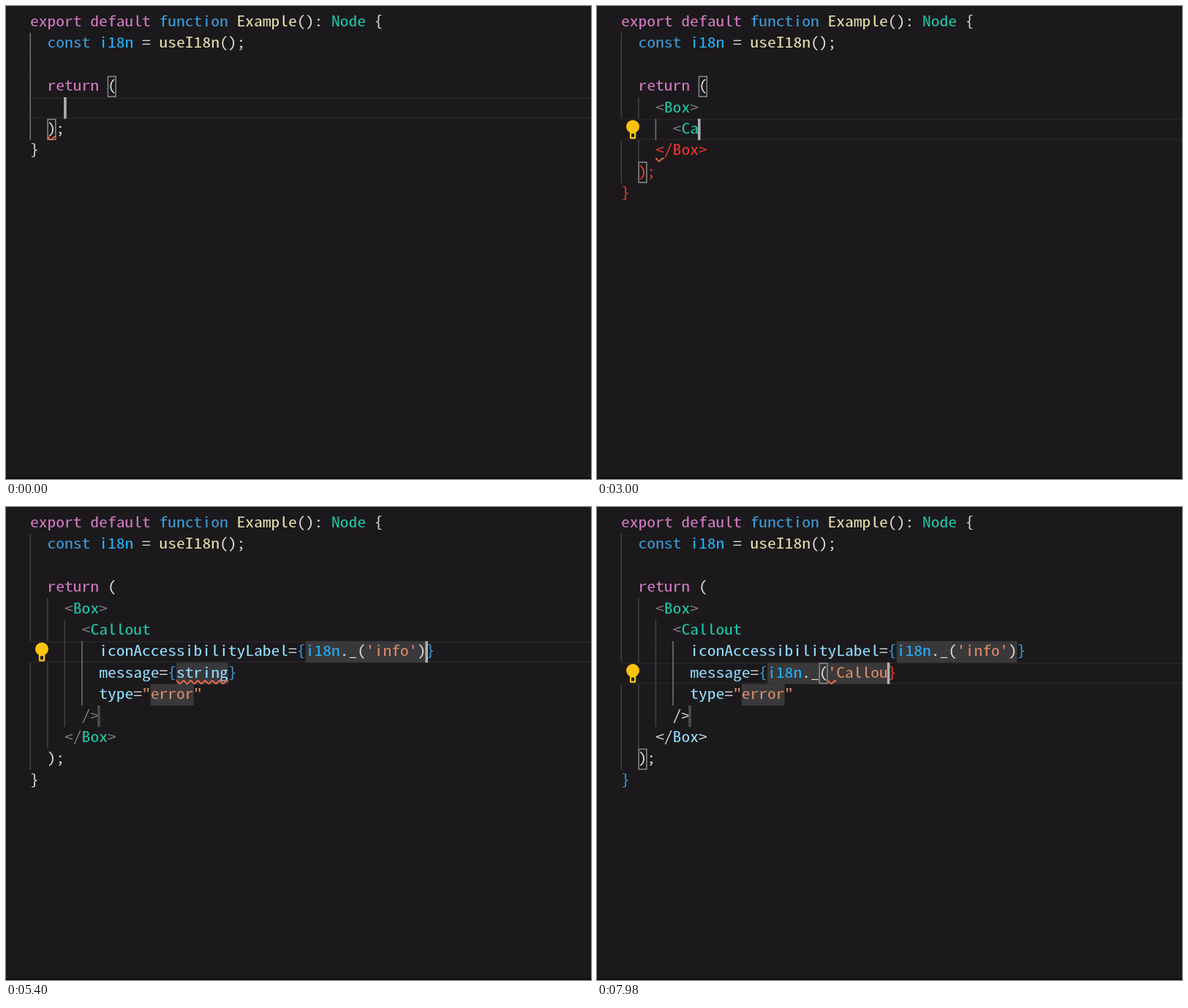
An HTML page with a canvas for the animation above (8000 ms loop, 800x648 px).

```html
<!DOCTYPE html>
<html lang="en">
<head>
<meta charset="utf-8">
<title>Code editor</title>
<style>
  html, body { margin: 0; width: 100%; height: 100%; overflow: hidden; background: #1b191b; }
  canvas { display: block; }
</style>
</head>
<body>
<canvas id="stage" width="800" height="648"></canvas>
<script>
const ctx = document.getElementById('stage').getContext('2d');
const LOOP = 8000, LEFT = 33, TOP = 7.4, CELL = 11.77, ROW = 29.4;
const BACKGROUND = '#1b191b', PLACEHOLDER = '#39383a', SELECTION = '#15497a';
const COLORS = {
  p: '#d079c2', b: '#3c9ad8', v: '#22b2fa', y: '#e0e0ac', w: '#dadada',
  t: '#1dc9a8', a: '#92dcff', s: '#da8a68', g: '#7f7f7f', r: '#f2382f', d: '#2085b5'
};

// One advance fills one grid cell; a half-width face is flattened to the usual 0.6 em proportion.
const FAMILY = '"Noto Sans Mono CJK JP", "Noto Sans Mono", monospace';
ctx.font = '100px ' + FAMILY;
const ADVANCE = ctx.measureText('0').width / 100;
const FONT = CELL / ADVANCE + 'px ' + FAMILY;
const FLATTEN = ADVANCE / 0.6;

// Keystrokes: field, time of the first key, time between keys, text.
const KEYS = [
  ['box', 900, 130, '<Box'],
  ['callout', 2700, 140, '<Cal'],
  ['label', 3880, 66, "i18n._('"],
  ['label', 4480, 110, 'info'],
  ['label', 5000, 150, "')"],
  ['message', 6650, 80, "i18n._('"],
  ['message', 7420, 100, 'Callou']
].flatMap(([field, start, step, text]) =>
  [...text].map((char, i) => ({ field, char, time: start + i * step })));
const BOX_INSERTED = 1500, CALLOUT_INSERTED = 3260, NEXT_FIELD = 5800, CHECK_DELAY = 250;
const CARET_RESETS = [0, BOX_INSERTED, CALLOUT_INSERTED, NEXT_FIELD, ...KEYS.map(k => k.time)];

const typed = (field, t) =>
  KEYS.filter(k => k.field === field && k.time <= t).map(k => k.char).join('');
const colX = col => LEFT + col * CELL;
const rowY = row => TOP + row * ROW;

function fill(color, x, y, w, h, radius = 0) {
  ctx.fillStyle = color;
  ctx.beginPath();
  ctx.roundRect(x, y, w, h, radius);
  ctx.fill();
}

const mark = (color, row, col, length, radius) =>
  fill(color, colX(col), rowY(row), length * CELL, ROW, radius);

// A tilde and a letter switch the colour of the text that follows.
function text(row, col, markup) {
  ctx.save();
  ctx.font = FONT;
  ctx.translate(0, rowY(row) + 20.6);
  ctx.scale(1, FLATTEN);
  for (const run of markup.split('~').slice(1)) {
    const content = run.slice(1);
    ctx.fillStyle = COLORS[run[0]];
    ctx.fillText(content, colX(col), 0);
    col += content.length;
  }
  ctx.restore();
}

function lineHighlight(row) {
  fill('#252326', 36, rowY(row), 764, 2);
  fill('#252326', 36, rowY(row) + ROW - 2, 764, 2);
}

function guides(list, bulbRow) {
  for (const [level, first, last, active] of list) {
    for (let row = first; row <= last; row++) {
      if (row === bulbRow && level < 2) continue;
      fill(active ? '#6c6b6c' : '#3f3e40', colX(level * 2) - 0.6, rowY(row), 1.7, ROW);
    }
  }
}

function bracketBox(row, col) {
  ctx.strokeStyle = '#868686';
  ctx.lineWidth = 1.6;
  ctx.strokeRect(colX(col) + 0.5, rowY(row) + 0.9, CELL - 1, ROW - 1.8);
}

function squiggle(row, col, length) {
  const start = colX(col), end = colX(col + length), y = rowY(row) + 26.8;
  ctx.strokeStyle = '#f2684a';
  ctx.lineWidth = 1.9;
  ctx.beginPath();
  for (let x = start; x <= end; x += 0.5) ctx.lineTo(x, y - 2 * Math.cos((x - start) * Math.PI / 4.9));
  ctx.stroke();
}

function bulb(row) {
  const y = rowY(row);
  ctx.fillStyle = '#ffc20d';
  ctx.beginPath();
  ctx.arc(49, y + 10.8, 9, 0, Math.PI * 2);
  ctx.fill();
  fill('#ffc20d', 44.8, y + 17, 8.4, 10.6, 1.5);
  fill(BACKGROUND, 47, y + 20.4, 4, 4.8);
}

function caret(row, col, t) {
  const idle = t - Math.max(...CARET_RESETS.filter(time => time <= t));
  if (idle % 1000 < 500) fill('#aeafad', colX(col) - 1, rowY(row), 3.6, ROW);
}

const header = (t, unused) => {
  text(0, 0, '~pexport default ~bfunction ~yExample~w(): ~tNode ~w{');
  text(1, 2, `~bconst ~${unused ? 'd' : 'v'}i18n ~w= ~yuseI18n~w();`);
  text(3, 2, '~preturn ~w(');
};

function emptyScene(t) {
  const tag = typed('box', t), tail = tag ? 'r' : 'w';
  lineHighlight(4);
  guides(tag ? [[0, 1, 5], [1, 4, 4, true]] : [[0, 1, 5, true]]);
  bracketBox(3, 9);
  bracketBox(5, 2);
  header(t);
  if (tag) text(4, 4, `~g<~t${tag.slice(1)}`);
  text(5, 2, `~${tail});`);
  text(6, 0, `~${tail}}`);
  if (!tag) squiggle(5, 2, 1);
  caret(4, 4 + tag.length, t);
}

function boxScene(t) {
  const tag = typed('callout', t), checked = t >= BOX_INSERTED + CHECK_DELAY;
  const bulbRow = tag ? 5 : checked ? 4 : -1;
  if (tag) lineHighlight(5);
  else {
    if (checked) mark('#27343a', 0, 35, 4);
    mark(SELECTION, 5, 6, 4, 4);
  }
  guides([[0, 1, 7], [1, 4, 6], [2, 5, 5, !!tag]], bulbRow);
  bracketBox(3, 9);
  bracketBox(7, 2);
  header(t);
  text(4, 4, '~g<~tBox~g>');
  text(5, 6, tag ? `~g<~t${tag.slice(1)}` : '~wnode');
  text(6, 4, tag ? '~r</Box>' : '~g</~tBox~g>');
  text(7, 2, tag ? '~r);' : '~w);');
  text(8, 0, tag ? '~r}' : '~w}');
  if (tag) squiggle(6, 4, 1);
  else squiggle(7, 2, 1);
  if (bulbRow > 0) bulb(bulbRow);
  caret(5, tag ? 6 + tag.length : 10, t);
}

const colorCall = code => code.replace(
  /^(i\w*)(\.?)(_?)(\(?)('[^)]*)?(\)?)$/, '~v$1~w$2~y$3~w$4~s$5~w$6');

function calloutScene(t) {
  const label = typed('label', t), message = typed('message', t);
  const onMessage = t >= NEXT_FIELD;
  const row = onMessage ? 7 : 6, col = onMessage ? 17 : 32;
  const current = onMessage ? message : label;
  const open = current.includes('(') && !current.includes(')');
  const checked = t >= CALLOUT_INSERTED + CHECK_DELAY;
  const unused = checked && label.length < 4;

  if (current) lineHighlight(row);
  mark(PLACEHOLDER, 6, 32, (label || 'string').length);
  mark(PLACEHOLDER, 7, 17, (message || 'string').length);
  mark(PLACEHOLDER, 8, 14, 5);
  if (!current) mark('#2c5273', row, col, 6, 4);
  guides([[0, 1, 11], [1, 4, 10], [2, 5, 9], [3, 6, 8, !!current]], row);
  if (open) {
    bracketBox(row, col + current.indexOf('('));
    bracketBox(11, 2);
  }

  header(t, unused);
  text(4, 4, '~g<~tBox~g>');
  text(5, 6, '~g<~tCallout');
  const field = (line, name, value, openBrace, closeBrace) =>
    text(line, 8, `~a${name}~w=~${openBrace}{${value ? colorCall(value) : '~astring'}~${closeBrace}}`);
  const labelOpen = open && !onMessage, messageOpen = open && onMessage;
  field(6, 'iconAccessibilityLabel', label, 'b', labelOpen ? 'r' : 'b');
  field(7, 'message', message, labelOpen ? 'w' : 'b', messageOpen ? 'r' : labelOpen ? 'w' : 'b');
  text(8, 8, '~atype~w=~s"error"');
  text(9, 6, open ? '~w/>' : '~g/>');
  text(10, 4, open ? '~w</~aBox~w>' : '~g</~tBox~g>');
  text(11, 2, '~w);');
  text(12, 0, open ? '~b}' : '~w}');

  if (unused) squiggle(1, 8, 4);
  if (checked && !label) squiggle(6, 32, 6);
  if (checked && !message && !open) squiggle(7, 17, 6);
  if (open && current.includes("'")) squiggle(row, col + current.indexOf("'"), 1);
  fill('#4b4a4c', colX(8) - 2, rowY(9), 3.6, ROW);
  bulb(row);
  caret(row, col + (current || 'string').length, t);
}

function draw(now) {
  const t = now % LOOP;
  fill(BACKGROUND, 0, 0, 800, 648);
  fill('#0d0c0d', 0, 646, 800, 2);
  if (t < BOX_INSERTED) emptyScene(t);
  else if (t < CALLOUT_INSERTED) boxScene(t);
  else calloutScene(t);
  requestAnimationFrame(draw);
}
requestAnimationFrame(draw);
</script>
</body>
</html>
```
